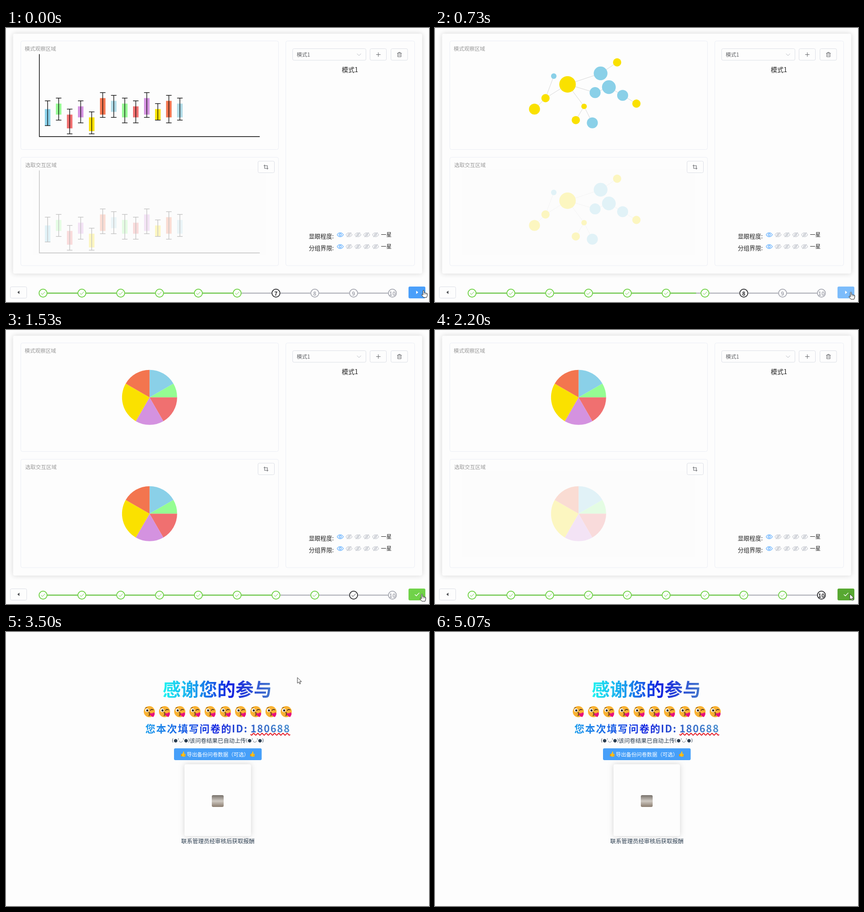
Animation of 929 by 603 pixels, one loop 5.11 s. Source, as an HTML page with a canvas:

```html
<!DOCTYPE html>
<html lang="zh-CN">
<head>
<meta charset="utf-8">
<title>问卷</title>
<style>
html, body { margin: 0; width: 100%; height: 100%; overflow: hidden; background: #fdfdfd; }
canvas { display: block; width: 929px; height: 603px; }
</style>
</head>
<body>
<canvas id="stage"></canvas>
<script>
const W = 929, H = 603, LOOP = 5110, U = 6.05;
const PAGE_SWAP = 2300;
const STEP_AT = { 8: 30, 9: 780, 10: 1520 };
const FONT = '"Noto Sans CJK SC", "Noto Sans CJK", sans-serif';
const SKY = '#8ad0e8', GREEN = '#95fd92', RED = '#f07070', PLUM = '#d492e0',
      YELLOW = '#fae100', CORAL = '#f3754f', PALE = '#b0dae6';
const DONE = '#67cf3b', WAIT = '#a5a7b0', DARK = '#28292c', EDGE = '#dcdfe6', PAPER = '#fdfdfd';

const canvas = document.getElementById('stage');
const ctx = canvas.getContext('2d');
const ratio = window.devicePixelRatio || 1;
canvas.width = W * ratio;
canvas.height = H * ratio;

const clamp = v => Math.max(0, Math.min(1, v));
const ramp = (t, from, span) => clamp((t - from) / span);
const ease = k => k * k * (3 - 2 * k);

function mix(a, b, k) {
  const part = (c, i) => parseInt(c.substr(1 + i * 2, 2), 16);
  return 'rgb(' + [0, 1, 2].map(i => Math.round(part(a, i) + (part(b, i) - part(a, i)) * k)) + ')';
}

function text(str, x, y, size, color, opt = {}) {
  ctx.font = `${opt.weight || 400} ${size}px ${opt.font || FONT}`;
  ctx.textAlign = opt.align || 'left';
  ctx.textBaseline = 'middle';
  ctx.letterSpacing = (opt.gap || 0) + 'px';
  ctx.fillStyle = color;
  ctx.fillText(str, x, y);
  ctx.letterSpacing = '0px';
}

function line(points, color, width = 1, close = false) {
  ctx.beginPath();
  points.forEach(([x, y], i) => i ? ctx.lineTo(x, y) : ctx.moveTo(x, y));
  if (close) ctx.closePath();
  ctx.strokeStyle = color;
  ctx.lineWidth = width;
  ctx.stroke();
}

function shape(points, fill) {
  ctx.beginPath();
  points.forEach(([x, y]) => ctx.lineTo(x, y));
  ctx.closePath();
  ctx.fillStyle = fill;
  ctx.fill();
}

function disc(x, y, r, fill) {
  ctx.beginPath();
  ctx.arc(x, y, r, 0, Math.PI * 2);
  ctx.fillStyle = fill;
  ctx.fill();
}

function box(x, y, w, h, r, fill, stroke) {
  ctx.beginPath();
  ctx.roundRect(x, y, w, h, r);
  if (fill) { ctx.fillStyle = fill; ctx.fill(); }
  if (stroke) { ctx.strokeStyle = stroke; ctx.lineWidth = 1; ctx.stroke(); }
}

function card(x, y, w, h) {
  ctx.save();
  ctx.shadowColor = 'rgba(0,0,0,.16)';
  ctx.shadowBlur = 12 * ratio;
  box(x, y, w, h, 4, PAPER);
  ctx.restore();
}

function at(x, y, draw) {
  ctx.save();
  ctx.translate(x, y);
  draw();
  ctx.restore();
}

// Charts sit on a unit grid: origin at the lower left, y upwards.
const gx = u => 73.3 + u * U;
const gy = u => 239 - u * U;

const BOXES = [
  [13, 10, 4, 4], [14, 12, 8, 6], [10, 8, 3, 1], [13, 11, 7, 5], [9, 7, 2, 1],
  [16, 14, 8, 7], [15, 13, 9, 7], [14, 12, 7, 5], [13, 11, 7, 5], [16, 14, 8, 7],
  [12, 10, 6, 6], [15, 13, 7, 5], [14, 12, 7, 6]
];
const BOX_COLORS = [SKY, GREEN, RED, PLUM, YELLOW, CORAL, PALE];

function boxChart() {
  BOXES.forEach(([top, q3, q1, low], i) => {
    const x = gx(3 + 4 * i);
    const color = BOX_COLORS[i < 7 ? i : 1 + (i - 7) % 6];
    ctx.fillStyle = color;
    ctx.fillRect(x - U, gy(q3), 2 * U, (q3 - q1) * U);
    line([[x, gy(top)], [x, gy(low)]], '#000', 1.3);
    for (const v of [top, low]) line([[x - U, gy(v)], [x + U, gy(v)]], '#000', 1.3);
  });
  line([[gx(0), gy(30)], [gx(0), gy(0)], [gx(80), gy(0)]], '#000', 1.4);
}

const NODES = [
  [36, 19, 3, YELLOW], [48, 23, 2.5, SKY], [54, 27, 1.5, YELLOW], [46, 16, 2, SKY],
  [51, 18, 2.5, SKY], [56, 15, 2, SKY], [61, 12, 1.5, YELLOW], [42, 11, 1, YELLOW],
  [39, 6, 1.5, YELLOW], [45, 5, 2, SKY], [28, 14, 1.5, YELLOW], [24, 10, 2, YELLOW], [31, 22, 1, SKY]
];
const PARENTS = [, 0, 1, 0, 3, 4, 5, 0, 7, 7, 0, 10, 10];

function network() {
  PARENTS.forEach((p, i) => {
    const a = NODES[p], b = NODES[i];
    line([[gx(a[0]), gy(a[1])], [gx(b[0]), gy(b[1])]], '#d2d2d2', 0.9);
  });
  for (const [x, y, r, color] of NODES) disc(gx(x), gy(y), r * U, color);
}

const SLICES = [[60, SKY], [30, GREEN], [60, RED], [60, PLUM], [90, YELLOW], [60, CORAL]];

function pie() {
  let from = -90;
  for (const [span, color] of SLICES) {
    ctx.beginPath();
    ctx.moveTo(gx(40), gy(15));
    ctx.arc(gx(40), gy(15), 10 * U, from * Math.PI / 180, (from + span) * Math.PI / 180);
    ctx.fillStyle = color;
    ctx.fill();
    from += span;
  }
}

// The lower copy is drawn on its own layer so that it fades as one picture.
function faded(chart, alpha) {
  ctx.save();
  ctx.translate(0, 256);
  chart();
  ctx.globalAlpha = 1 - alpha;
  ctx.fillStyle = PAPER;
  ctx.fillRect(60, 54, 510, 190);
  ctx.restore();
}

function eye(x, y, on) {
  const color = on ? '#409eff' : '#c0c4cc';
  at(x, y, () => {
    ctx.beginPath();
    ctx.moveTo(-6.8, 0);
    ctx.bezierCurveTo(-3.5, -6, 3.5, -6, 6.8, 0);
    ctx.bezierCurveTo(3.5, 6, -3.5, 6, -6.8, 0);
    ctx.moveTo(2.4, 0);
    ctx.arc(0, 0, 2.4, 0, Math.PI * 2);
    ctx.strokeStyle = color;
    ctx.lineWidth = 1.1;
    ctx.stroke();
    if (!on) line([[-4.8, 5.2], [4.8, -5.2]], color, 1.2);
  });
}

function rating(label, y) {
  text(label, 665, y + 3, 12.8, '#222');
  for (let i = 0; i < 5; i++) eye(734 + i * 19.4, y, i === 0);
  text('一星', 823.5, y, 11.7, '#222');
}

function trash(x, y) {
  at(x, y, () => {
    line([[-5, -3], [5, -3]], '#606266');
    line([[-1.8, -3], [-1.8, -5], [1.8, -5], [1.8, -3]], '#606266');
    line([[-3.7, -3], [-3.7, 4.8], [3.7, 4.8], [3.7, -3]], '#606266');
    for (const v of [-1.3, 1.3]) line([[v, -0.8], [v, 2.6]], '#606266');
  });
}

function crop(x, y) {
  at(x, y, () => {
    line([[-5.2, -3], [3, -3], [3, 5.2]], '#606266', 1.1);
    line([[-3, -5.2], [-3, 3], [5.2, 3]], '#606266', 1.1);
  });
}

function check(x, y, color, s, width) {
  line([[x - 4.6 * s, y + 0.2 * s], [x - 1.4 * s, y + 3.2 * s], [x + 4.8 * s, y - 3.2 * s]], color, width);
}

function stepColor(n, t) {
  if (n < 7) return DONE;
  const start = n === 7 ? -1000 : STEP_AT[n];
  const end = n === 10 ? Infinity : STEP_AT[n + 1];
  if (t >= end) return mix(DARK, DONE, ramp(t, end + 20, 130));
  return mix(WAIT, DARK, ramp(t, start + 20, 130));
}

function stepper(t) {
  const y = 583.5, xOf = n => 81.4 + (n - 1) * 85.25;
  for (let n = 1; n < 10; n++) {
    const a = xOf(n) + 9.5, b = xOf(n + 1) - 9.5;
    line([[a, y], [b, y]], WAIT, 1.8);
    // each bar fills later the further along it is
    const filled = n < 6 ? 1 : n < 9 ? ramp(t, STEP_AT[n + 2] + 150 * (n - 1) - 100, 60) : 0;
    if (filled) line([[a, y], [a + (b - a) * filled, y]], DONE, 1.8);
  }
  for (let n = 1; n <= 10; n++) {
    const x = xOf(n), color = stepColor(n, t);
    ctx.beginPath();
    ctx.arc(x, y, 8.8, 0, Math.PI * 2);
    ctx.fillStyle = PAPER;
    ctx.fill();
    ctx.strokeStyle = color;
    ctx.lineWidth = 1.8;
    ctx.stroke();
    const done = n < 7 || (n < 10 && t >= STEP_AT[n + 1]);
    if (done) check(x, y, color, 0.95, 1);
    else text(String(n), x, y + 0.5, 12, color, { weight: 700, align: 'center' });
  }
}

const BUTTON_KEYS = [
  [0, '#4a9ffa'], [30, '#4a9ffa'], [150, '#7cbcfb'], [735, '#7cbcfb'], [750, '#3a86d6'], [780, '#3a86d6'],
  [900, '#7cbcfb'], [1450, '#7cbcfb'], [1470, '#3a86d6'], [1500, '#3a86d6'], [1520, '#70d249'],
  [1550, '#70d249'], [1660, '#95d475'], [2160, '#95d475'], [2190, '#57a831'], [2300, '#57a831']
];

function buttonColor(t) {
  const i = Math.max(1, BUTTON_KEYS.findIndex(k => k[0] > t));
  const [t0, a] = BUTTON_KEYS[i - 1], [t1, b] = BUTTON_KEYS[i];
  return mix(a, b, ramp(t, t0, t1 - t0));
}

function survey(t) {
  card(15.5, 12.5, 898.5, 528);
  box(32.5, 28.5, 566, 239, 4, null, '#ebeef5');
  box(32.5, 284.5, 566, 238.5, 4, null, '#ebeef5');
  box(614.5, 28.5, 283, 494.5, 4, null, '#ebeef5');

  const chart = t < STEP_AT[8] ? boxChart : t < STEP_AT[10] ? network : pie;
  const since = t < STEP_AT[8] ? 9999 : t - (chart === pie ? STEP_AT[10] : STEP_AT[8]);
  chart();
  faded(chart, 1 - 0.76 * ease(ramp(since, 30, 400)));

  text('模式观察区域', 41, 46, 11.5, '#999');
  text('选取交互区域', 42.3, 301.5, 11.5, '#999');
  box(553.5, 293, 36, 25.5, 3, PAPER, EDGE);
  crop(571, 306);

  box(629.5, 45.5, 161, 25.5, 3, PAPER, EDGE);
  text('模式1', 638.5, 59, 11.5, '#606266');
  line([[771, 56.5], [775.3, 60.8], [779.6, 56.5]], '#b4b7be');
  box(799.5, 45.5, 36, 25.5, 3, PAPER, EDGE);
  line([[813, 58.5], [822.5, 58.5]], '#606266');
  line([[817.7, 53.7], [817.7, 63.2]], '#606266');
  box(845.5, 45.5, 36.5, 25.5, 3, PAPER, EDGE);
  trash(864, 58.5);
  text('模式1', 755.5, 91.5, 14, '#222', { align: 'center' });
  rating('显眼程度:', 455);
  rating('分组界限:', 481);

  box(9.5, 569.5, 36, 25, 3, PAPER, EDGE);
  shape([[25, 581.7], [29.5, 578], [29.5, 585.4]], '#4a4c50');
  stepper(t);
  box(884, 569, 37, 26, 3, buttonColor(t));
  if (t < STEP_AT[10]) shape([[900.8, 578], [900.8, 585.4], [905.3, 581.7]], '#fff');
  else check(902.7, 581.7, '#fff', 1.05, 1.3);
}

function kissFace(x, y) {
  at(x, y, () => {
    disc(0, 0, 12.2, '#f9b233');
    disc(-5, -3, 4, '#fff');
    disc(-4.5, -2.6, 2.4, '#33261d');
    ctx.lineCap = 'round';
    line([[-9, -8], [-5.5, -9.4]], '#6b4516', 1.2);
    line([[2.3, -3], [5, -5], [8.5, -4]], '#33261d', 1.6);
    ctx.beginPath();
    ctx.arc(-0.8, 3.4, 1.8, -2, 1.5);
    ctx.arc(-0.8, 7, 1.8, -1.5, 2);
    ctx.strokeStyle = '#4a2a18';
    ctx.lineWidth = 1.4;
    ctx.stroke();
    ctx.translate(7, 6.5);
    ctx.rotate(-0.25);
    ctx.beginPath();
    ctx.moveTo(0, 5.6);
    ctx.bezierCurveTo(-9, -0.5, -4.5, -7, 0, -2.6);
    ctx.bezierCurveTo(4.5, -7, 9, -0.5, 0, 5.6);
    ctx.fillStyle = '#e8127c';
    ctx.fill();
  });
}

function thumb(x, y) {
  at(x, y, () => {
    shape([[-3, -0.5], [-0.6, -2.2], [0.2, -6], [2, -5.8], [2.4, -3.6], [1.8, -1], [5, -0.8],
           [5.3, 1], [4.5, 5], [0, 5.5], [-3, 4]], '#fcc21b');
    shape([[-5, 0], [-2.6, -1], [-2.6, 4.8], [-5, 4.4]], '#e59a12');
    for (const v of [1.2, 3.2]) line([[1.4, v], [5, v]], '#d98e10', 0.7);
  });
}

function blend(x0, x1, stops) {
  const g = ctx.createLinearGradient(x0, 0, x1, 0);
  stops.forEach(([k, c]) => g.addColorStop(k, c));
  return g;
}

function thanks() {
  const head = blend(344, 584, [[0, '#1ff5f0'], [0.3, '#1a9eee'], [0.62, '#1522e0'], [1, '#4579cc']]);
  text('感谢您的参与', 344, 126, 40, head, { weight: 700 });
  for (let i = 0; i < 10; i++) kissFace(314.8 + i * 33.4, 175.3);

  const sub = blend(306, 624, [[0, '#1a9cec'], [0.5, '#1526e0'], [0.75, '#3566c8'], [1, '#4a8fcf']]);
  const bold = { weight: 700, gap: 1.8 };
  text('您本次填写问卷的', 306, 212.5, 22, sub, bold);
  text('ID:', 496, 212.5, 22, sub, bold);
  text('180688', 537, 212.5, 22, sub, { weight: 700, gap: 1.6 });
  const wave = [];
  for (let x = 537; x <= 624; x++) wave.push([x, 225 + 2 * Math.sin((x - 537) * Math.PI / 4.6)]);
  line(wave, '#e3101c', 1.9);

  const ink = '#2c3e50', mid = { align: 'center' };
  text('该问卷结果已自动上传', 465, 239.5, 12.4, ink, mid);
  for (const x of [384, 546.5]) {
    text("(●'◡'●)", x, 239.5, 10, ink, { align: 'center', font: '"DejaVu Sans", sans-serif' });
  }

  box(369, 256, 192.5, 26, 3, '#469ff9');
  text('导出备份问卷数据（可选）', 397, 269.5, 11.4, '#fff');
  thumb(389, 269);
  thumb(541, 269);

  card(392, 291, 146, 158);
  const photo = ctx.createLinearGradient(0, 359, 0, 385);
  photo.addColorStop(0, '#77716b');
  photo.addColorStop(0.5, '#cfc9c2');
  photo.addColorStop(1, '#8a7c6e');
  box(452, 359, 26, 26, 3, photo);
  text('联系管理员经审核后获取报酬', 465.3, 460.5, 12.4, ink, mid);
}

function arrow(x, y) {
  const p = [[0, 0], [0, 12.4], [2.9, 9.7], [5, 14.2], [7, 13.3], [5, 9], [9, 9]];
  at(x, y, () => {
    shape(p, '#fff');
    line(p, '#222', 0.9, true);
  });
}

function hand(x, y) {
  at(x, y, () => {
    ctx.beginPath();
    ctx.moveTo(-1.3, 9);
    ctx.lineTo(-1.3, 1.2);
    ctx.quadraticCurveTo(0, -1, 1.3, 1.2);
    ctx.lineTo(1.3, 6);
    ctx.quadraticCurveTo(3, 4.8, 4, 6.4);
    ctx.quadraticCurveTo(5.6, 5.4, 6.4, 7);
    ctx.quadraticCurveTo(8.2, 6.4, 8.4, 8.2);
    ctx.lineTo(8.2, 12);
    ctx.lineTo(6.8, 16);
    ctx.lineTo(0, 16);
    ctx.lineTo(-4.4, 10.4);
    ctx.quadraticCurveTo(-4, 8.2, -1.3, 10.6);
    ctx.closePath();
    ctx.fillStyle = '#fff';
    ctx.fill();
    ctx.strokeStyle = '#222';
    ctx.lineWidth = 1;
    ctx.stroke();
    for (const v of [1.3, 4, 6.4]) line([[v, 7], [v, 9.6]], '#222', 0.7);
  });
}

const POINTER = [
  [0, 917, 577], [30, 917, 577], [250, 913.5, 581], [2130, 913.5, 581], [2180, 911, 581],
  [2480, 911, 581], [2900, 621, 497], [2960, 621, 497], [3230, 626, 440], [3620, 644, 3], [3780, 643, 8]
];

function pointer(t) {
  const i = POINTER.findIndex(k => k[0] > t);
  if (i < 1) return;
  const [t0, x0, y0] = POINTER[i - 1], [t1, x1, y1] = POINTER[i];
  const k = ease(ramp(t, t0, t1 - t0));
  (t < 2150 ? hand : arrow)(x0 + (x1 - x0) * k, y0 + (y1 - y0) * k);
}

function render(t) {
  ctx.setTransform(ratio, 0, 0, ratio, 0, 0);
  ctx.lineCap = 'butt';
  ctx.fillStyle = PAPER;
  ctx.fillRect(0, 0, W, H);
  if (t < PAGE_SWAP) survey(t);
  else thanks();
  pointer(t);
}

const start = performance.now();
function tick() {
  render((performance.now() - start) % LOOP);
  requestAnimationFrame(tick);
}
tick();
</script>
</body>
</html>
```
